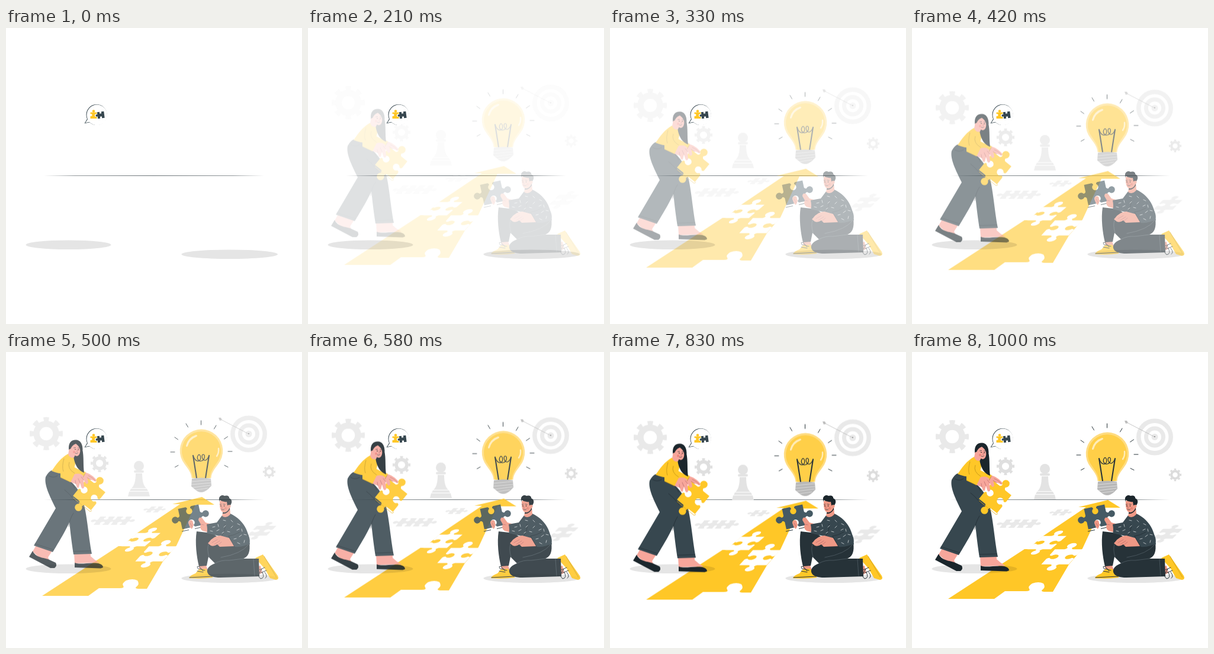
An HTML page for the animation above (1040 ms loop, 500 by 500 pixels).

```html
<!DOCTYPE html>
<html lang="en">
<head>
<meta charset="utf-8">
<title>Puzzle teamwork</title>
<style>
  html, body { margin: 0; width: 100%; height: 100%; overflow: hidden; background: #fff; }
  svg { display: block; width: 100vw; height: 100vh; }
  .drop { animation: drop 1040ms infinite; }
  .fade { animation: fade 1040ms infinite; }
  /* one second of motion, then a short hold */
  @keyframes drop {
    0% { opacity: 0; transform: translateY(-20px); animation-timing-function: cubic-bezier(.36, -.01, .5, 1.38); }
    96.154%, 100% { opacity: 1; transform: none; }
  }
  @keyframes fade {
    0% { opacity: 0; animation-timing-function: cubic-bezier(.36, -.01, .5, 1.38); }
    96.154%, 100% { opacity: 1; }
  }
  .yellow { fill: #ffc727; }
  .slate { fill: #37474f; }
  .dark { fill: #263238; }
  .ink { fill: #1b262c; }
  .rosy { fill: #f7a69b; }
  .tan { fill: #ef9885; }
  .pale { fill: #e9e9e9; }
  .white { fill: #fff; }
  .line { fill: none; stroke: #263238; stroke-linecap: round; stroke-linejoin: round; }
  .fold { fill: none; stroke: #1b262c; stroke-width: .6; stroke-linecap: round; }
  .crease { fill: none; stroke: #b5686a; stroke-width: .7; stroke-linecap: round; }
</style>
</head>
<body>
<svg viewBox="0 0 500 500" stroke-width=".8">
  <defs>
    <linearGradient id="floor">
      <stop offset="0" stop-color="#263238" stop-opacity="0"/>
      <stop offset=".14" stop-color="#263238" stop-opacity=".5"/>
      <stop offset=".5" stop-color="#263238" stop-opacity=".68"/>
      <stop offset=".86" stop-color="#263238" stop-opacity=".5"/>
      <stop offset="1" stop-color="#263238" stop-opacity="0"/>
    </linearGradient>
    <!-- tabs above and below, sockets left and right -->
    <path id="jig" d="M-16.500-16.500H-5Q-2.800-17.500-2.800-20A5.300 5.300 0 1 1 2.800-20Q2.800-17.500 5-16.500H16.500V-4.500Q16-2.400 13.500-2.400A4.900 4.900 0 1 0 13.500 2.400Q16 2.400 16.500 4.500V16.500H5Q2.800 17.500 2.800 20A5.300 5.300 0 1 1-2.800 20Q-2.800 17.500-5 16.500H-16.500V4.500Q-16 2.400-13.500 2.400A4.900 4.900 0 1 0-13.500-2.400Q-16-2.400-16.500-4.500Z"/>
    <g id="gear" fill="none">
      <circle r="16.500" stroke-width="10.500"/>
      <circle r="24.300" stroke-width="7.400" pathLength="16" stroke-dasharray=".95 1.050" stroke-dashoffset=".475"/>
    </g>
  </defs>

  <rect x="64" y="249" width="372" height="1" fill="url(#floor)"/>

  <g class="drop">
    <use href="#gear" x="68" y="143" stroke="#e9e9e9"/>
    <use href="#gear" transform="translate(158 193) scale(.54)" stroke="#dfdfdf"/>
    <use href="#gear" transform="translate(444.500 207.500) scale(.38)" stroke="#dcdcdc"/>

    <g class="pale">
      <circle cx="410" cy="143.500" r="31"/>
      <circle class="white" cx="410" cy="143.500" r="23.500"/>
      <circle cx="410" cy="143.500" r="18"/>
      <circle class="white" cx="410" cy="143.500" r="11"/>
      <circle cx="410" cy="143.500" r="5.500"/>
    </g>
    <path d="M361 118 410 143.500" stroke="#b0b0b0" stroke-width=".7"/>
    <path d="M359 116l4 0 2 4-4 1z" fill="#bdbdbd"/>
    <circle cx="410" cy="143" r="1" fill="#888"/>

    <g fill="#e3e3e3">
      <circle cx="224.500" cy="197.500" r="8.500"/>
      <rect x="216" y="205" width="17" height="4" rx="2"/>
      <path d="M219 210H230C230 222 232 231 237 235H212C217 231 219 222 219 210Z"/>
      <path d="M211 236H238L240 240H209Z"/>
      <path d="M208 241H241L243 249H206Z"/>
    </g>

    <g class="pale">
      <use href="#jig" transform="matrix(-.35 .42 .75 0 166 290)"/>
      <use href="#jig" transform="matrix(-.35 .42 .75 0 195 290)"/>
      <use href="#jig" transform="matrix(-.3 .3 .62 0 251 271)"/>
      <use href="#jig" transform="matrix(1 0 -.5 .5 432 307)"/>
    </g>
  </g>

  <g class="drop">
    <path class="yellow" d="M61 417 190 333 196 333 222 310.500 294 262H281L331 250 352 263H320L288 332 265 359 238 405H223Q216 404 221 401Q226 397 222 391Q214 387 203 391Q195 396 198 400Q201 404 192 404H157L139 417Z"/>
    <g class="white">
      <use href="#jig" transform="matrix(1.200 0 -.8 .68 228 322)"/>
      <use href="#jig" transform="matrix(1.400 0 -.7 .78 253 346)"/>
    </g>
  </g>

  <g opacity=".1">
    <ellipse cx="105.500" cy="366.300" rx="72" ry="7.800"/>
    <ellipse cx="377.700" cy="382.300" rx="81.300" ry="7.800"/>
  </g>

  <g class="drop">
    <path d="M313.500 218C313 209 308 203 302 195A36.300 36.300 0 1 1 358 195C352 203 347 209 346.500 218Z" fill="#ffdc80"/>
    <path d="M315.500 218C315 208 310 201 304 192.500A33 33 0 1 1 356 192.500C350 201 345 208 344.500 218Z" fill="#ffcf48"/>
    <path d="M304 163Q308 149 321 145Q326 146 320 149Q310 153 307 164Q304 167 304 163Z" fill="#ffecb8"/>
    <path d="M359 168Q360 175 356 181" fill="none" stroke="#ffecb8" stroke-width="2.500" stroke-linecap="round"/>
    <path class="line" d="M316 180Q320 191 326 189C331 186 328 176 325 179C321 184 325 191 330 189C336 188 337 178 333 178C329 180 332 189 337 188Q341 186 343 180" stroke-width="1.200"/>
    <path class="line" d="M322 218 316 180M337 218 343 180" stroke-width="2"/>
    <path d="M314 219Q330 216 346 219L347 231 341 237Q335 242 330 242Q324 242 319 237L313 232Z" fill="#b8b8b8"/>
    <path d="M314 224 346 221M313 229 347 226M315 234 346 230M320 238 341 235" stroke="#e4e4e4"/>
    <path class="line" d="M329.500 121V128M304 126 307.500 132M355 129 351.500 135M285 149 290.500 153M374.500 148 368.500 152M278 174H285M382 173H375M285.500 199.500 291 196.500M375 199.500 369 196.500" stroke-width="1"/>
  </g>

  <g>
    <path class="slate" d="M138 152 132.500 161.200 142 159.300Z"/>
    <circle class="slate" cx="153" cy="146.500" r="17.500"/>
    <circle class="white" cx="153.700" cy="146.900" r="17.300"/>
    <path class="white" d="M139 152.500 134 160.200 143 158.300Z"/>
    <path class="yellow" d="M142.500 142.500H153.500V153H142.500Z"/>
    <circle class="yellow" cx="148" cy="140.500" r="2.300"/>
    <circle class="white" cx="143.500" cy="147" r="2"/>
    <circle class="white" cx="152.500" cy="147.500" r="2.600"/>
    <g class="slate" transform="rotate(-7 160 147)">
      <path d="M154.500 141.500H158.500V144.500H161.500V141.500H166V152.500H161.500V149.500H158.500V152.500H154.500Z"/>
      <circle cx="153.300" cy="147" r="1.900"/>
    </g>
  </g>

  <g class="drop">
    <!-- feet -->
    <path class="rosy" d="M53 328 78 341 71 352 76 362 58 354 45 342ZM115 345H143V350Q150 357 158 361L116 362Z"/>
    <path class="ink" d="M45 341C50 352 61 352 71 355L84 361Q87 366 82 370H75L39 351ZM116 361C126 365 140 360 156 362Q164 364 164 369L160 370.500 116 369Z"/>
    <!-- trousers -->
    <path class="slate" d="M88 210C114 223 124 237 130 257C137 278 139 315 145 346L114 347C110 321 108 302 106 281L94 238Z"/>
    <path class="slate" d="M77 205 100 209C114 224 120 243 115 271C110 292 93 320 79 343L47 332 84 269C74 249 64 229 67 216Q71 208 77 205Z"/>
    <path class="fold" d="M114 277Q107 288 106 300M94 210Q111 224 116 235M72 214Q80 219 87 214M49 329 80 339M114 342 143 341M99 238Q111 248 117 257"/>
    <!-- far sleeve and hand -->
    <path class="rosy" d="M129 208Q142 208 153 221L151 224Q142 219 132 220Z"/>
    <path class="yellow" d="M110 196Q121 204 135 208L130 217Q119 214 108 209Z"/>
    <!-- torso and head -->
    <path class="yellow" d="M105 177C92 184 85 195 77 206Q93 213 113 210L118 190 113 181Z"/>
    <path class="ink" d="M122 158Q129 160 129 169C132 183 130 196 132 209C123 206 116 197 114 181Z"/>
    <path class="rosy" d="M107 167 105 178Q109 186 115 183L118 176Z"/>
    <path class="rosy" d="M108 163Q117 155 124 163C127 171 125 181 119.500 181Q109 179 108 166Z"/>
    <path class="ink" d="M106 170Q105 153.500 118 153.500Q129 154 129.500 170L126 173Q125 165 118 160Q110 163 108.500 171Z"/>
    <circle class="rosy" cx="108.500" cy="171" r="2.300"/>
    <circle cx="117" cy="169.500" r=".8"/>
    <circle cx="122.500" cy="170" r=".8"/>
    <path class="line" d="M114.500 167 117.500 166.500M121.500 167 124 167.500M117 176Q119.500 177.500 121.500 175.500" stroke-width=".7"/>
    <circle cx="115" cy="174" r="2" fill="#ee837c"/>
    <path class="crease" d="M120 169 121 173H119"/>
    <!-- jigsaw piece -->
    <use href="#jig" class="yellow" transform="translate(140.500 245) rotate(38.700) scale(1.180)"/>
    <path d="M113 251 142 274.500 145 273" fill="none" stroke="#e0aa16"/>
    <!-- near arm -->
    <path class="rosy" d="M108 216Q117 209 126 211L138 219 139 226Q136 230 134 226L131 221 132 234Q129 238 127 233L125 226 123 234Q120 236 119 231L118 228 107 224Z"/>
    <path class="crease" d="M125 226 122 219M131 221 127 216M118 228 117 222M139 214Q147 217 151 223M137 217 143 221"/>
    <path class="yellow" d="M98 184C91 192 92 204 92 217L109 225 116 211 105 205 106 193Z"/>
    <path d="M98 185Q94 199 97 207M92 217 109 225M107 191Q103 202 116 210M134 210 130 217" fill="none" stroke="#a98012" stroke-width=".6"/>
  </g>

  <g class="fade">
    <!-- shoes -->
    <path class="tan" d="M325 356 338 360 341 369 327 368ZM425 362 430 361 433 373 427 376Z"/>
    <path class="yellow" d="M309 382Q311 377 320 374L326 367 337 366 350 376 349 381Q330 384 309 382Z"/>
    <path class="yellow" d="M421 348 434 342 459 378Q462 384 456 385L446 382 437 366Z"/>
    <path class="line" d="M323 370 333 372M326 366 336 369M325 367Q320 360 327 363L333 370M310 381 348 379" stroke-width="1"/>
    <path class="line" d="M428 368 437 364M430 373 440 369M432 367Q423 378 430 383Q438 382 433 372M437 372Q443 379 438 382" stroke-width="1"/>
    <path d="M436 345 457 381" stroke="#c89a18"/>
    <!-- trousers -->
    <path class="dark" d="M322 303C319 322 322 346 326 362L339 361 342 346 353 357C340 362 338 369 341 374Q345 381 362 381L428 379 427 349H401Q414 344 411 322L375 324 348 306Z"/>
    <path class="fold" d="M401 349 377 352Q363 351 353 357M343 346Q339 333 342 325M410 325Q398 341 363 347M418 350 420 378" style="stroke:#5d6b72"/>
    <!-- jigsaw piece -->
    <use href="#jig" fill="#455a64" transform="translate(311.500 278.500) rotate(78) scale(1.070)"/>
    <path d="M297 303 309 300.500M319 298.500 330 296" stroke="#2b3a42" stroke-width="1.200"/>
    <!-- arm holding the piece -->
    <path class="tan" d="M343 305 332 302Q326 298 329 291L325 284Q325 278 331 280L337 288 347 291Z"/>
    <path class="tan" d="M308 287Q311 282 315 285L317 292 314 299Q309 296 308 287Z"/>
    <path class="crease" d="M311 289 315 296M329 291 334 292"/>
    <!-- shirt -->
    <path class="slate" d="M365 276 356 288 339 291Q341 302 339 306L361 311 380 328 412 325C410 303 403 285 379 273Z"/>
    <path class="tan" d="M343 321Q350 311 362 310L380 315 386 328 361 329 357 325Q351 329 346 327L341 323Z"/>
    <path class="crease" d="M348 322 357 317M352 325 361 319M358 326 364 321"/>
    <path class="slate" d="M386 287C405 294 415 315 411 323Q402 330 386 329L375 311 394 306Z"/>
    <path class="fold" d="M395 304Q385 310 376 311M376 311 386 329M365 310Q371 301 370 291"/>
    <path d="M349 296l4-1M345 302l4 1M358 291l1 4M356 302l4-2M367 284l4 1M368 296l3-3M374 303l4 1M380 284l3 3M383 294l-3 3M391 290l4 2M390 301l4-2M398 299l1 4M402 308l4 1M394 312l4-3M385 316l4-1M391 322l4 2M403 318l-1 4M365 306l3-2" stroke="#d5dadc" stroke-width=".8" stroke-linecap="round"/>
    <!-- head -->
    <path class="tan" d="M367 266 365 277Q372 282 379 274L378 259Z"/>
    <path d="M366 271Q374 270 378 263L378 266Q373 274 366 273Z" class="ink"/>
    <path class="tan" d="M361 252Q369 247 378 254C379 264 375 271 368 271Q360 270 361 252Z"/>
    <path class="ink" d="M361 253C357 245 364 240 369 243C375 241 378 245 377 247C383 249 382 256 378 260L374 259 373 253Q367 254 361 250Z"/>
    <circle class="tan" cx="377" cy="260.500" r="2.500"/>
    <circle cx="363" cy="260" r=".8"/>
    <circle cx="368.500" cy="260" r=".8"/>
    <path class="line" d="M361.500 257.500 364 257M367 257 370 257.500M364 266Q366 267.500 368.500 266" stroke-width=".7"/>
    <path class="crease" d="M365 260 364 264H366"/>
    <circle cx="371" cy="264" r="2" fill="#e5806f"/>
  </g>
</svg>
</body>
</html>
```
